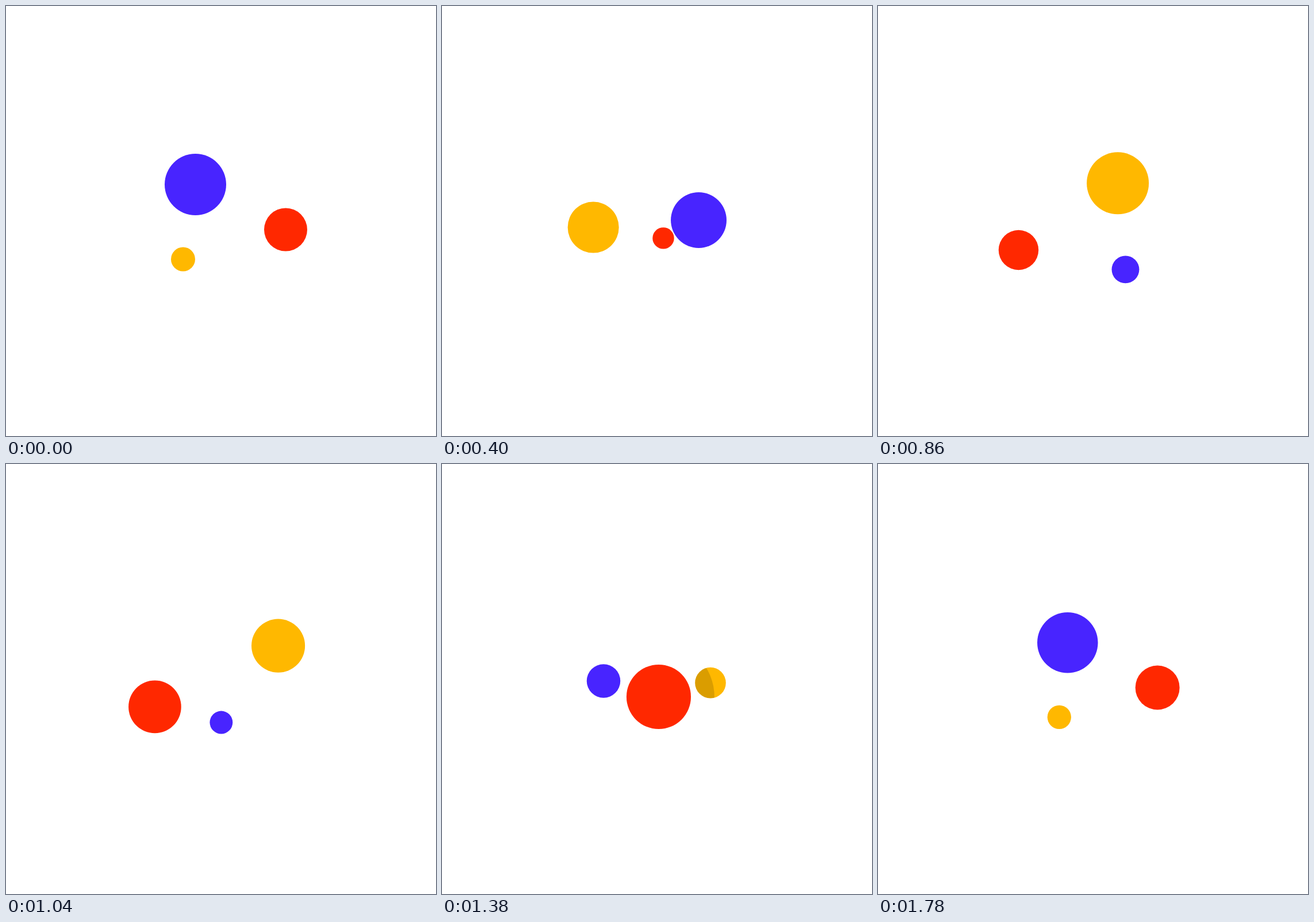
Write an HTML page with a canvas that moves like this. It is 748 px wide and 748 px high and loops after 1800 ms.

```html
<!DOCTYPE html>
<html lang="en">
<head>
<meta charset="utf-8">
<title>Orbiting balls</title>
<style>
  html, body { margin: 0; width: 100%; height: 100%; overflow: hidden; background: #fff; }
  canvas { display: block; }
</style>
</head>
<body>
<canvas id="stage" width="748" height="748"></canvas>
<script>
const LOOP = 1800, STEP = 20, HALF = LOOP / 2;
const SHADOW_REACH = 1.73;
const ctx = document.getElementById('stage').getContext('2d');

// Eased keyframes: flat at inner keys; start and end set the slope at the loop's ends.
function track(keys, start = 0, end = 0) {
  return t => {
    let i = 0;
    while (i < keys.length - 2 && t >= keys[i + 1][0]) i++;
    const [t0, v0] = keys[i], [t1, v1] = keys[i + 1];
    const s = (t - t0) / (t1 - t0);
    const out = i === 0 ? start : 0;
    const into = i === keys.length - 2 ? end : 0;
    const p = s * s * (3 - 2 * s) + out * s * (1 - s) ** 2 + into * s * s * (s - 1);
    return v0 + (v1 - v0) * p;
  };
}

const swing = (a, b) => track([[0, a], [HALF, b], [LOOP, a]]);

const balls = [
  {
    color: '#4824ff',
    x: track([[0, 329.5], [600, 470.8], [1500, 271.3], [LOOP, 338]], 1.18, 1.9),
    y: swing(310.5, 459.2),
    r: track([[0, 53.5], [150, 55.1], [1050, 19.9], [LOOP, 53.9]], 1.2, 1.25)
  },
  {
    color: '#ff2800',
    x: swing(486.5, 243.1),
    y: swing(389, 424.7),
    r: track([[0, 37.5], [450, 18.3], [1350, 56.2], [LOOP, 37.5]], 1.16, 1.16)
  },
  {
    color: '#ffb800',
    x: track([[0, 308], [300, 255], [1200, 493.5], [LOOP, 308]], 2.1, 1.16),
    y: swing(440.5, 307.5),
    r: track([[0, 21], [750, 55.5], [1650, 18.9], [LOOP, 21]], 1.13, 1.16)
  }
];

const pose = t => balls.map(b => ({ color: b.color, x: b.x(t), y: b.y(t), r: b.r(t) }));
const gap = (a, b) => Math.hypot(a.x - b.x, a.y - b.y);

function disc(x, y, r, color) {
  ctx.fillStyle = color;
  ctx.beginPath();
  ctx.arc(x, y, r, 0, Math.PI * 2);
  ctx.fill();
}

// A nearer ball darkens the one about to pass behind it.
function shade(ball, caster) {
  ctx.save();
  ctx.beginPath();
  ctx.arc(ball.x, ball.y, ball.r, 0, Math.PI * 2);
  ctx.clip();
  disc(caster.x, caster.y, caster.r * SHADOW_REACH, 'rgba(0, 0, 0, 0.145)');
  ctx.restore();
}

function draw(t) {
  const now = pose(t), next = pose(t + 1);
  const order = [0, 1, 2].sort((a, b) => now[a].r - now[b].r);
  ctx.fillStyle = '#fff';
  ctx.fillRect(0, 0, 748, 748);
  order.forEach((i, depth) => {
    const ball = now[i];
    disc(ball.x, ball.y, ball.r, ball.color);
    for (const j of order.slice(depth + 1)) {
      const closing = gap(next[i], next[j]) < gap(ball, now[j]);
      const near = gap(ball, now[j]) < ball.r + now[j].r * SHADOW_REACH;
      if (closing && near) shade(ball, now[j]);
    }
  });
}

const began = performance.now();
function tick() {
  const t = (performance.now() - began) % LOOP;
  draw(Math.floor(t / STEP) * STEP);
  requestAnimationFrame(tick);
}
tick();
</script>
</body>
</html>
```
